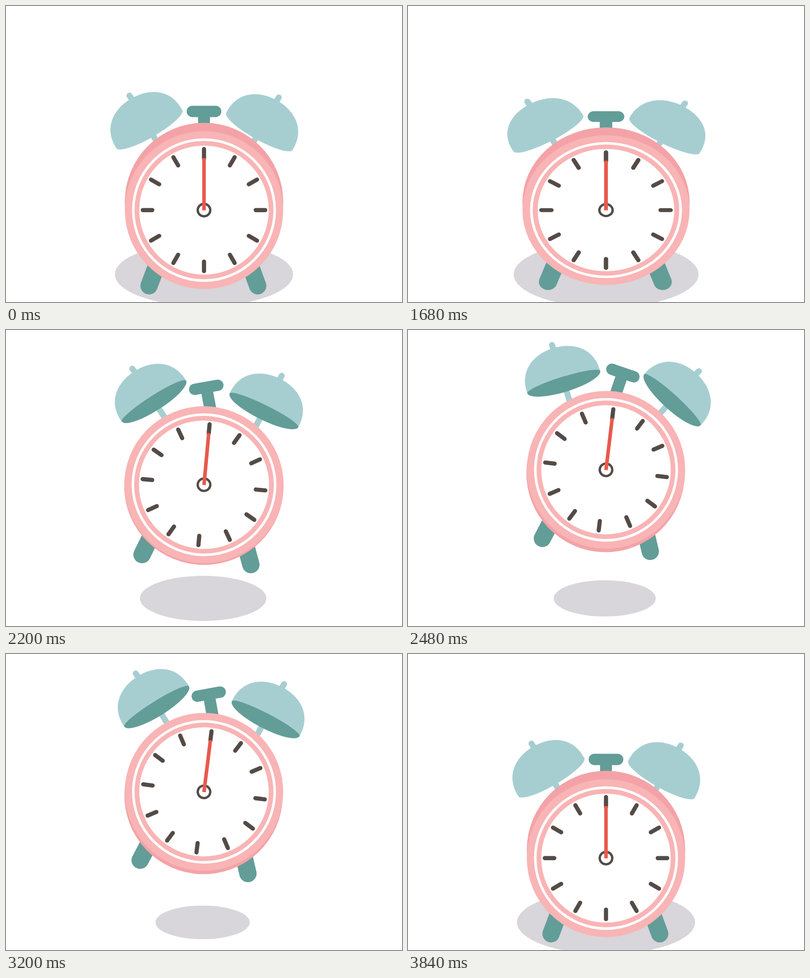
Recreate the animation shown at these times as an HTML page with a canvas. Size 800 by 600 pixels, loop 4 s.

```html
<!DOCTYPE html>
<html lang="en">
<head>
<meta charset="utf-8">
<title>Alarm clock</title>
<style>
  html, body { margin: 0; width: 100%; height: 100%; overflow: hidden; background: #fff; }
  canvas { display: block; }
</style>
</head>
<body>
<canvas id="stage" width="800" height="600"></canvas>
<script>
const ctx = document.getElementById('stage').getContext('2d');
const TAU = Math.PI * 2, RAD = Math.PI / 180;
const LOOP = 4000, STEP = 40, LAST = 3840;
const color = {
  shadow: '#d8d5db', teal: '#639d98', bell: '#a6ced1',
  pink: '#f9b4b5', rose: '#f3a3a7', ink: '#544b46', hand: '#e9594c'
};

const progress = (t, from, to) => Math.min(1, Math.max(0, (t - from) / (to - from)));
const easeInOut = x => (1 - Math.cos(Math.PI * x)) / 2;
const easeOut = (x, power) => 1 - (1 - x) ** power;
const bump = (t, from, peak, to) =>
  easeInOut(progress(t, from, peak)) - easeInOut(progress(t, peak, to));

function pose(t) {
  const lift = 136 * (easeOut(progress(t, 1900, 2960), 4) - progress(t, 3052, 3689) ** 3);
  const far = easeOut(progress(t, 1900, 3000), 3) - progress(t, 3052, 3645) ** 3;
  const stretch = 1 + 0.15 * bump(t, 1510, 1920, 2240) + 0.1 * bump(t, 3640, 3720, 3840);
  const ringing = progress(t, 1960, 2260) - progress(t, 3540, 3680);
  return {
    lift, stretch,
    lean: lift / 19 * RAD,
    shadow: 1 - 0.478 * far + 0.68 * (stretch - 1),
    tilt: easeInOut(progress(t, 1900, 2300)) - easeInOut(progress(t, 3240, 3640)),
    ring: -10.2 * RAD * ringing * Math.sin(TAU * (t - 2762) / 202),
    hand: TAU * easeInOut(progress(t, 0, 1475))
  };
}

function disc(x, y, rx, fill, ry = rx) {
  ctx.beginPath();
  ctx.ellipse(x, y, rx, ry, 0, 0, TAU);
  ctx.fillStyle = fill;
  ctx.fill();
}

function line(x1, y1, x2, y2, width, stroke, cap = 'round') {
  ctx.beginPath();
  ctx.moveTo(x1, y1);
  ctx.lineTo(x2, y2);
  ctx.lineWidth = width;
  ctx.lineCap = cap;
  ctx.strokeStyle = stroke;
  ctx.stroke();
}

function at(x, y, angle, draw) {
  ctx.save();
  ctx.translate(x, y);
  ctx.rotate(angle);
  draw();
  ctx.restore();
}

// The origin is the foot of the stem; the rim lies 46 px above it.
function bell(side, tilt) {
  ctx.scale(side, 1);
  line(0, 4, 0, -46, 12, color.bell, 'butt');
  ctx.translate(0, -46);
  line(0, -66, -0.5, -79, 12, color.bell);
  if (tilt > 0) disc(0, 0, 77, color.teal, 17 + 3 * tilt);
  const sag = 28 * (1 - tilt) ** 5 - 11;
  ctx.beginPath();
  ctx.moveTo(-77, 0);
  ctx.bezierCurveTo(-79, -50, -40, -72, 0, -72);
  ctx.bezierCurveTo(40, -72, 79, -50, 77, 0);
  ctx.ellipse(0, 0, 77, Math.abs(sag), 0, 0, sag < 0 ? -Math.PI : Math.PI, sag < 0);
  ctx.closePath();
  ctx.fillStyle = color.bell;
  ctx.fill();
}

function handle() {
  line(0, 0, 0, -50, 24, color.teal, 'butt');
  line(-23.5, -50, 23.5, -50, 23, color.teal);
}

function face(hand) {
  disc(0, 0, 160, color.pink);
  disc(0, 0, 145.5, '#fff');
  disc(0, 0, 140.3, color.pink);
  disc(0, 0, 130.8, '#fff');
  for (let i = 0; i < 12; i++) {
    at(0, 0, i * TAU / 12, () => line(0, -104.5, 0, -123.7, 8.4, color.ink));
  }
  disc(0, 0, 15, color.ink);
  disc(0, 0, 10.3, '#fff');
  at(0, 0, hand, () => line(0, 0.5, 0, -105.5, 7.2, color.hand, 'butt'));
}

function render(t) {
  const p = pose(t);
  ctx.fillStyle = '#fff';
  ctx.fillRect(0, 0, 800, 600);
  disc(394 + 6 * p.shadow, 544, 180 * p.shadow, color.shadow, 64.3 * p.shadow);

  at(400, 413.7 - p.lift, p.lean, () => {
    ctx.scale(p.stretch, 1 / p.stretch);
    line(-91, 100, -111, 153.5, 35, color.teal);
    line(89, 100, 108.5, 153.5, 35, color.teal);
    at(0, -150, 1.95 * p.ring, handle);
    at(-87.3, -124.4, -30.2 * RAD + p.ring, () => bell(1, p.tilt));
    at(89.5, -119.5, 29.3 * RAD + p.ring, () => bell(-1, p.tilt));
    disc(0, -17 + 24 * p.tilt, 160, color.rose);
    face(p.hand);
  });
}

const start = performance.now();
function tick() {
  const t = (performance.now() - start) % LOOP;
  render(Math.min(LAST, Math.floor(t / STEP) * STEP));
  requestAnimationFrame(tick);
}
tick();
</script>
</body>
</html>
```
